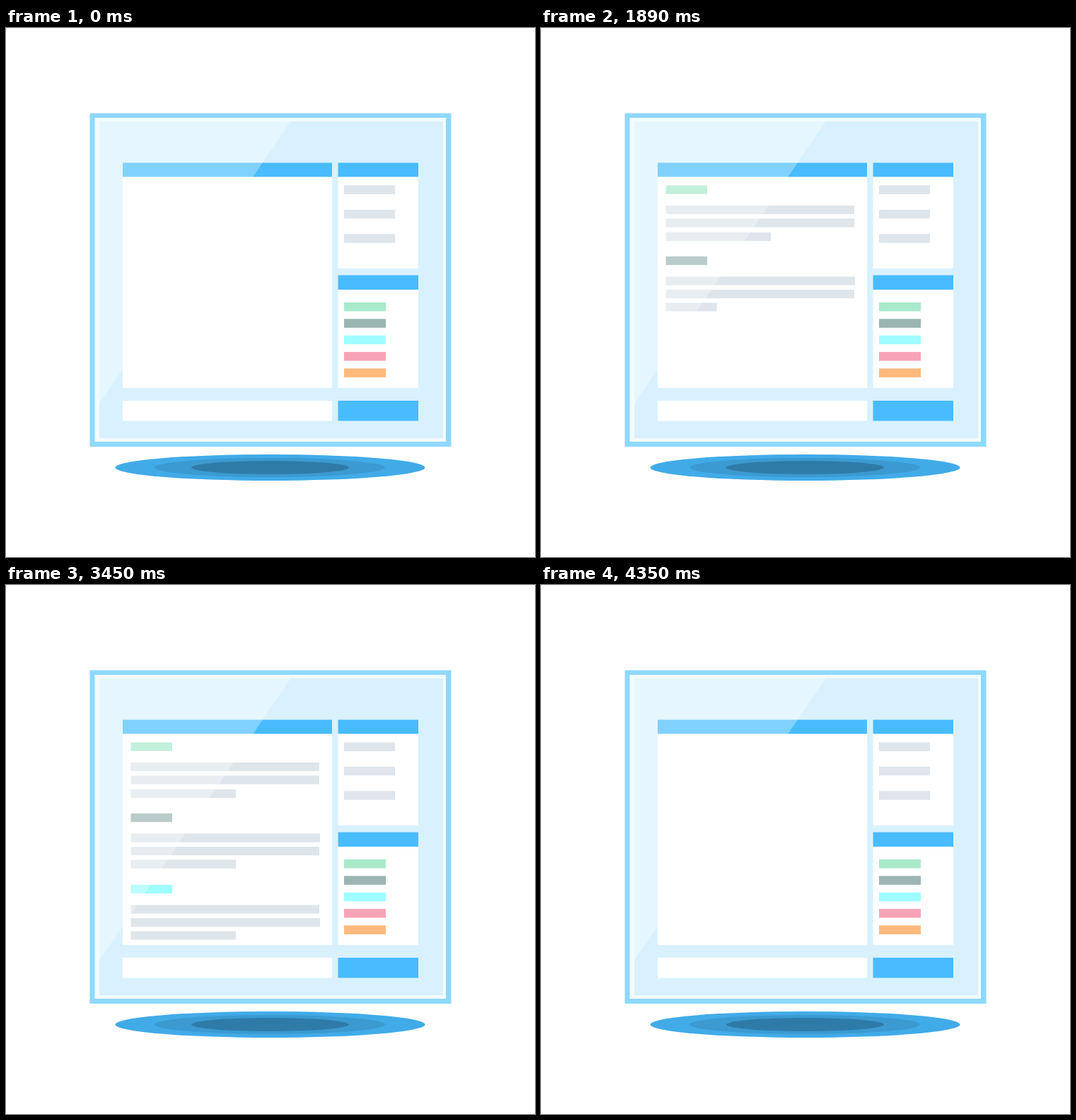
Recreate the animation shown at these times as an HTML page. Size 748 by 748 pixels, loop 4620 ms.

```html
<!DOCTYPE html>
<html lang="en">
<head>
<meta charset="utf-8">
<title>Chat window</title>
<style>
html, body { margin: 0; width: 100%; height: 100%; overflow: hidden; background: #fff; }
svg { display: block; width: 100%; height: 100%; }
</style>
</head>
<body>
<svg viewBox="0 0 748 748">
  <defs>
    <clipPath id="pane"><rect x="165" y="211" width="296" height="298"/></clipPath>
  </defs>
  <ellipse cx="373.5" cy="621.5" rx="219" ry="18.5" fill="#41abe8"/>
  <ellipse cx="373" cy="621.5" rx="163" ry="13.5" fill="#3b9ad1"/>
  <ellipse cx="373.5" cy="621.5" rx="111.5" ry="9.5" fill="#2f7ba8"/>
  <g id="frame"></g>
  <g clip-path="url(#pane)"><g id="chat"></g></g>
  <path d="M132 132H402.5L132 531Z" fill="#fff" fill-opacity=".31"/>
</svg>
<script>
const LOOP = 4620, STEP = 30;
const GREY = '#dee5eb', BLUE = '#48bcff';
const LABELS = ['#a8e9cb', '#9bb5b2', '#9ffcff', '#f8a4b6', '#ffb97d'];
const frame = document.getElementById('frame');
const chat = document.getElementById('chat');

function box(parent, x, y, w, h, fill) {
  const r = document.createElementNS('http://www.w3.org/2000/svg', 'rect');
  const attrs = { x, y, width: w, height: h, fill };
  for (const k in attrs) r.setAttribute(k, attrs[k]);
  parent.append(r);
  return r;
}

// Window and panels
box(frame, 118.5, 120.5, 511, 471.5, '#8ed8ff');
box(frame, 125.5, 127, 496.5, 458, '#f3fbff');
box(frame, 132, 132, 486, 448, '#d9f1ff');
[
  [165, 190.5, 296, 318.5, '#fff'],
  [165, 190.5, 296, 20, BLUE],
  [469.5, 190.5, 113.5, 149.5, '#fff'],
  [469.5, 190.5, 113.5, 20, BLUE],
  [469.5, 349.5, 113.5, 159.5, '#fff'],
  [469.5, 349.5, 113.5, 20.5, BLUE],
  [165, 527, 296, 28.5, '#fff'],
  [469.5, 527, 113.5, 28.5, BLUE]
].forEach(b => box(frame, ...b));
for (let i = 0; i < 3; i++) box(frame, 478, 222.5 + i * 34.4, 72, 12.5, GREY);
LABELS.forEach((c, i) => box(frame, 478, 388 + i * 23.35, 59, 12.5, c));

// Each message: start, length, y, widths of its three lines
const messages = [
  [30, 750, 222.5, [266.5, 266.5, 148.5]],
  [1110, 1080, 323, [267.5, 266.5, 148.5]],
  [2220, 1230, 424, [266.5, 267.5, 148.5]]
];
// Typing span of label and lines, as shares of a message's length
const spans = [[0, .15], [.1, .36], [.28, .54], [.46, 1]];
const offsets = [0, 28.5, 47, 65.5];
const parts = [];
messages.forEach(([start, len, y, widths], m) => {
  [58.5, ...widths].forEach((w, i) => {
    const top = y + offsets[i] + (m === 0 && i === 3 ? 1 : 0);
    parts.push({
      el: box(chat, 176.5, top, 0, 12.2, i ? GREY : LABELS[m]),
      from: start + len * spans[i][0],
      to: start + len * spans[i][1],
      w, top,
      drop: m === 0 && i === 3 ? 2.3 : 0
    });
  });
});

const progress = (t, a, b) => Math.min(1, Math.max(0, (t - a) / (b - a)));

function draw(now) {
  const t = Math.floor((now % LOOP) / STEP) * STEP;
  for (const p of parts) {
    const k = progress(t, p.from, p.to);
    p.el.setAttribute('width', p.w * k);
    if (p.drop) p.el.setAttribute('y', p.top + p.drop * (1 - k));
  }
  const scroll = -310.5 * progress(t, 3990, 4350);
  chat.setAttribute('transform', `translate(0 ${scroll})`);
}

let origin;
function tick(now) {
  if (origin === undefined) origin = now;
  draw(now - origin);
  requestAnimationFrame(tick);
}
draw(0);
requestAnimationFrame(tick);
</script>
</body>
</html>
```
